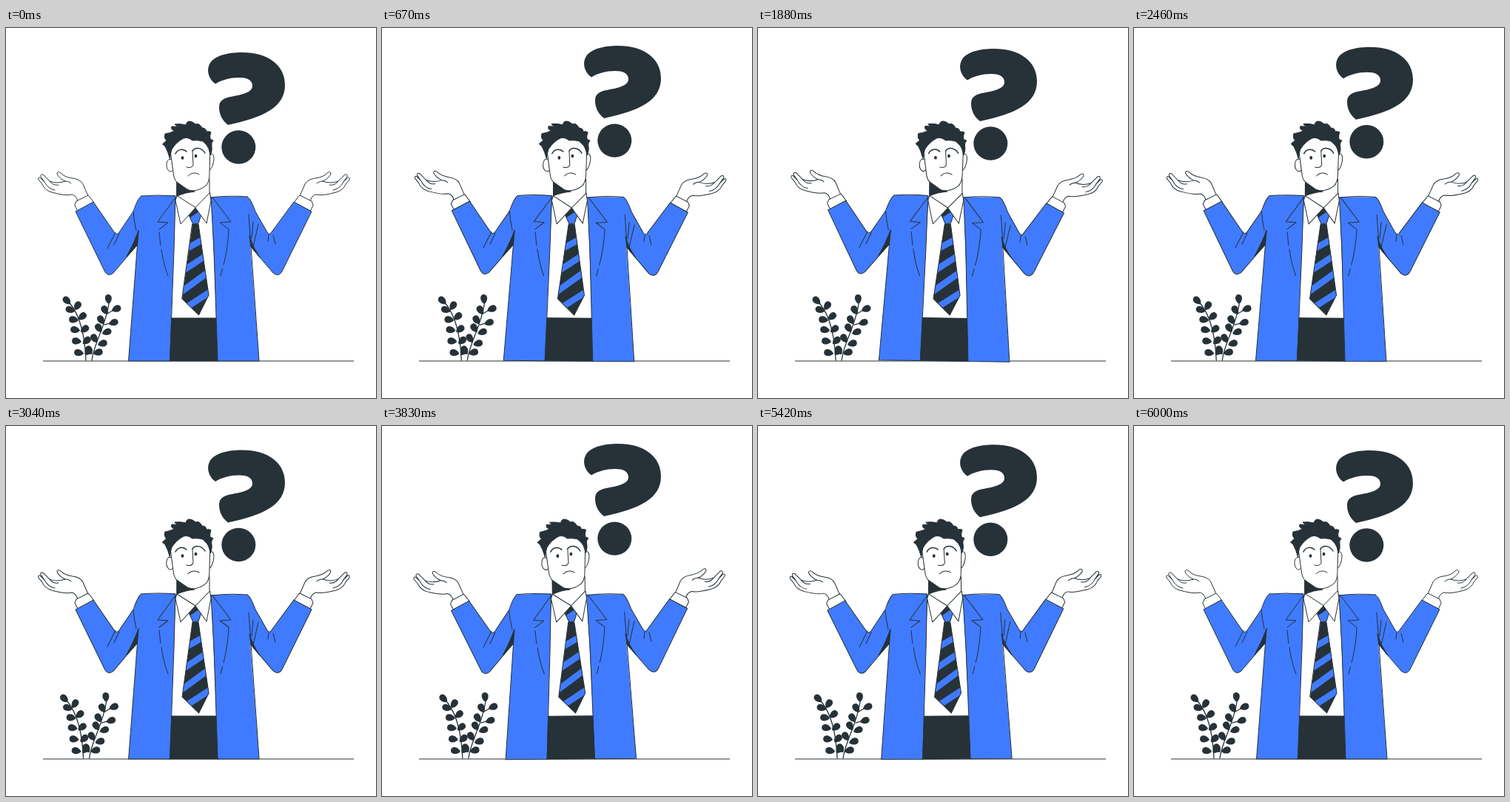
An HTML page that plays this animation: 500 by 500 pixels, repeating every 6.04 s.

```html
<!DOCTYPE html>
<html lang="en">
<head>
<meta charset="utf-8">
<title>Shrug</title>
<style>
  html, body { margin: 0; width: 100%; height: 100%; overflow: hidden; background: #fff; }
  svg { display: block; width: 100%; height: 100%; }
  .ink { fill: #263238; }
  .blue { fill: #407bff; }
  .skin { fill: #fff; }
  .line { fill: none; }
  #man, #plants { stroke: #263238; stroke-linecap: round; stroke-linejoin: round; }
</style>
</head>
<body>
<svg viewBox="0 0 500 500">
  <defs>
    <clipPath id="tieShape"><path d="M252 265H260L274 361L260.500 388L238 366Z"/></clipPath>
    <clipPath id="knotShape"><path d="M247 252L256 243L264.500 250L260 264L253 265Z"/></clipPath>
    <g id="hand" class="skin">
      <path d="M97 235C96 229 93 226 89 225C80 227 70 224 62 222C55 220 51 216 49 211L44 205C43 202 45 201 47 203L52 208L47 201C46 197 50 197 52 200L59 207C64 209 72 210 80 207C75 205 70 200 69 197C69 194 72 194 74 196C79 201 84 202 90 203C97 204 102 207 104 211L111 227Z"/>
      <path class="line" d="M52 208C55 214 60 218 66 219M59 207C62 211 66 213 71 212M80 207C83 207 86 208 88 210"/>
      <path d="M93 239L95 234L111 226L113 228L119 236L97 247Z"/>
    </g>
  </defs>

  <path d="M50 450H470" stroke="#263238"/>
  <g id="plants" class="ink">
    <path class="line" stroke-width="1.300" d="M108 449C107 425 103 393 87 373M116 449C119 425 134 405 139 373M137 386L144 382M133 401L140 399"/>
  </g>

  <g id="man" stroke-width="1">
    <use href="#hand"/>
    <use href="#hand" transform="matrix(-1 0 0 1 508 0)"/>

    <path class="skin" d="M229 230H278L285 393H222Z"/>
    <path class="ink" d="M222 392H284L287 450H220Z"/>

    <g class="blue">
      <path d="M183 227C178 230 175 240 172 248L153 276Q150 280 147 277L118 235L94 248L133 328C136 334 140 335 145 331L180 290L205 240Z"/>
      <path d="M326 228C331 231 334 240 337 248L353 276Q356 280 358 277L389 235L413 248L373 329C370 334 366 335 361 331L326 290L300 240Z"/>
      <path stroke="none" d="M183 227L229 226L227 300L221 450H165.500L179 274L172 248Z"/>
      <path class="line" d="M183 227Q205 225 229 227L227 300L221.500 450H165.500L179 274"/>
      <path stroke="none" d="M326 228L277 228L281 300L286 450H342L329 279L334 248Z"/>
      <path class="line" d="M326 228Q300 226 277 229L281 300L286 450H342L328 252"/>
    </g>
    <path class="ink" d="M179 274Q173 291 163 309L177 294ZM329 281Q333 296 343 310L331 295Z"/>
    <path class="line" d="M172 248Q173 261 176 274M148 276L137 298M153 278L146 293M334 262L332 284M341 265L334 296M355 279L354 288M361 280L364 292"/>
    <path class="line" d="M229 229L205 262L219 263L207 272M207 276C208 283 208 289 209 294M210 299C212 313 215 325 219 335M279 229L304 262L289 263L301 272C300 295 297 308 294 320M292.500 325L290 335"/>

    <path class="skin" d="M231 204V226L229 233L255 244L277 233L275 222V204Z"/>
    <path class="ink" d="M231 207L246 219L255 221Q243 222 231 227Z"/>

    <g clip-path="url(#tieShape)">
      <path class="ink" stroke="none" d="M230 260H280V390H230Z"/>
      <path class="line" stroke="#407bff" stroke-width="8.500" d="M232 305L280 278M232 333L280 301M232 360L280 325M232 385L280 354"/>
    </g>
    <path class="line" d="M252 265H260L274 361L260.500 388L238 366Z"/>
    <g clip-path="url(#knotShape)">
      <path class="ink" stroke="none" d="M240 240H270V270H240Z"/>
      <path class="blue" stroke="none" d="M240 262L270 242V262L246 276Z"/>
    </g>
    <path class="line" d="M247 252L256 243L264.500 250L260 264L253 265Z"/>
    <path class="skin" d="M231 227L229 233L236 265L256 243ZM275.500 223L277 233L271 264L256 243Z"/>

    <path class="skin" d="M224 178C216 174 215 189 220 193C222 195 224 194 226 192ZM275 171C281 167 282 175 280 183Q278 191 274 193Z"/>
    <path class="skin" d="M222 165L226 195Q227 206 232 209L245 218C252 222 263 219 270 213C275 208 275 200 275 193L276 162L258 146L232 148Z"/>
    <path class="ink" d="M221.500 177Q219 167 215 160L211.500 157L217 152Q213 149 215 143Q222 142 228 139Q222 137 224 133Q229 133 234 134Q229 132 228 130Q235 129 243 131Q244 127 247 126Q252 126 256 130Q261 128 265 135Q270 135 271 140Q275 139 277 141Q275 145 276 150L280 152Q277 155 278 160Q279 166 276 172Q275 163 271 158L266 153Q258 151 252 152Q246 147 240 149Q230 154 224 164Q222 170 221.500 177Z"/>
    <path class="line" stroke-width="1.500" d="M229 170C232 163 240 163 244 167M252 166C256 160 265 162 269 169"/>
    <ellipse class="ink" stroke="none" cx="238.500" cy="175.500" rx="1.900" ry="2.300"/>
    <ellipse class="ink" stroke="none" cx="256.500" cy="173" rx="1.900" ry="2.300"/>
    <path class="line" d="M252 166L253 185Q251 190 244 188M246 200C250 195 257 195 261 198"/>
  </g>

  <g id="question" class="ink">
    <path d="M283 75.500C273 69 271 56 275 49C281 37 300 33 319 33C354 33 377 50 377 77C377 107 348 121 300 131C291 124 288 115 288 107C288 98 294 95 303 93C320 90 333 87 333 78C333 70 325 67 315 67C303 67 292 70 283 75.500Z"/>
    <ellipse cx="314.300" cy="161" rx="23" ry="22.700"/>
  </g>
</svg>
<script>
  const $ = id => document.getElementById(id);

  // Leaves: base x, base y, direction in degrees.
  const leaves = [
    [87, 373, 225], [93, 383, 200], [98, 395, 188], [100, 409, 190], [102, 424, 188], [105, 440, 190],
    [93, 381, -58], [98, 394, -40], [101, 411, -38], [104, 427, -42], [107, 442, -52],
    [139, 373, -95], [137, 387, 240], [143, 382, -22], [132, 400, 238], [139, 400, -18],
    [129, 411, 238], [130, 413, -20], [123, 425, 238], [124, 428, -15], [118, 440, -15], [116, 441, 238]
  ];
  for (const [x, y, angle] of leaves) {
    const leaf = document.createElementNS("http://www.w3.org/2000/svg", "path");
    leaf.setAttribute("d", "M0 0C4-6 13-6 13 0S4 6 0 0");
    leaf.setAttribute("transform", `translate(${x} ${y}) rotate(${angle})`);
    leaf.setAttribute("stroke", "none");
    $("plants").append(leaf);
  }

  const LOOP = 6040, CYCLE = 6000, FLOAT = 1500, FPS = 24;
  const sway = [[0, 0], [.25, 1], [.75, -1], [1, 0]];
  const lift = [[0, 0], [.5, -10], [1, 0]];
  const shake = [0, -1, 2, -4, 4, -4, 4, -4, 2, -1, 0].map((x, i) => [i / 10, x]);

  // Linear interpolation through [progress, value] steps.
  function at(steps, time, period) {
    const p = time % period / period;
    const i = steps.findIndex(s => s[0] > p);
    const [p0, v0] = steps[i - 1], [p1, v1] = steps[i];
    return v0 + (v1 - v0) * (p - p0) / (p1 - p0);
  }

  const start = performance.now();
  function draw() {
    const now = (performance.now() - start) % LOOP;
    const t = Math.floor(now * FPS / 1000 + .15) * 1000 / FPS;
    $("man").setAttribute("transform", `rotate(${at(sway, t, CYCLE)} 254 288)`);
    $("plants").setAttribute("transform", `translate(${at(shake, t, CYCLE)} 0)`);
    $("question").setAttribute("transform", `translate(0 ${at(lift, t, FLOAT)})`);
    requestAnimationFrame(draw);
  }
  draw();
</script>
</body>
</html>
```
